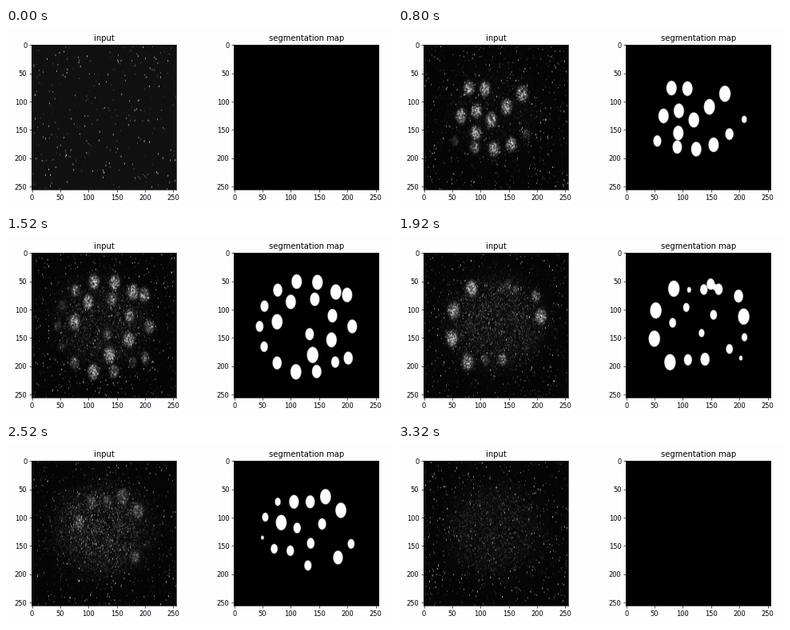
Recreate the animation shown at these times as a matplotlib script. Size 483x225 px, loop 3400 ms.

```python
import numpy as np
import matplotlib.pyplot as plt
from matplotlib.animation import FuncAnimation

W, H, DPI = 483, 225, 60
N = 256            # pixels per side of a slice
SLICES = 34        # 100 ms each, shown on a 40 ms clock
TICK = 40
CX, CY = 126, 131  # middle of the embryo
TALL = 1.42        # nuclei are taller than wide

yy, xx = np.mgrid[:N, :N].astype(float)


def sized(x, y, radii):
    """Nuclei at x, y with radii blended evenly along the row."""
    keys = np.linspace(0, 1, len(radii))
    return list(zip(x, y, np.interp(np.linspace(0, 1, len(x)), keys, radii)))


def chain(n, start, end, *radii, bend=0):
    """n nuclei from start to end, bowed sideways by bend."""
    t = np.linspace(0, 1, n)
    dx, dy = np.subtract(end, start)
    bow = bend * np.sin(np.pi * t) / np.hypot(dx, dy)
    return sized(start[0] + dx * t - dy * bow, start[1] + dy * t + dx * bow, radii)


def arc(n, radius, a0, a1, *radii):
    """n nuclei on an arc around the middle of the embryo."""
    a = np.radians(np.linspace(a0, a1, n))
    return sized(CX + radius * np.cos(a), CY + radius * np.sin(a), radii)


def single(x, y, r):
    return [(x, y, r)]


top = (chain(4, (174, 87), (92, 156), 10, 9)
       + chain(6, (55, 170), (208, 132), 7, 9, 9, 4.5, bend=32)
       + chain(2, (80, 77), (66, 126), 9)
       + chain(2, (108, 78), (93, 117), 9))
upper = (arc(11, 81, 50, 311, 7, 9.5, 6.5, 7, 9, 9.5)
         + chain(3, (199, 75), (201, 186), 9, 8, bend=-8)
         + arc(6, 51, 190, 436, 9.5, 8, 10)
         + single(133, 144, 7.5))
lower = (arc(4, 79, 128, 238, 10)
         + chain(4, (198, 77), (202, 186), 8, 10, 5, 3, bend=-9)
         + chain(3, (111, 66), (163, 65), 3.5, 6.5, 7)
         + chain(2, (149, 56), (156, 61), 7, 4)
         + chain(2, (109, 189), (139, 188), 7, 8)
         + chain(2, (82, 124), (106, 97), 6, 5.5)
         + chain(2, (154, 110), (182, 170), 6)
         + single(133, 142, 5))
bottom = (chain(3, (77, 73), (134, 73), 5, 8.5, 8)
          + chain(2, (161, 64), (188, 88), 9.5)
          + chain(3, (55, 100), (111, 119), 5.5, 9.5, 6.5)
          + chain(3, (50, 136), (99, 159), 2.5, 6, 6.5, bend=9)
          + chain(3, (155, 112), (130, 185), 7, 6.3, bend=8)
          + chain(2, (206, 147), (183, 171), 6, 8.5))

# (nuclei, widest slice, reach above, reach below)
LAYERS = [(top, 8, 5, 5), (upper, 15, 5, 4), (lower, 19, 4, 5),
          (bottom, 25, 5, 4), (single(77, 115, 1.8), 29, 3, 2)]


def visible(s):
    """Nuclei cut by slice s, with the radius of the cut."""
    for nuclei, z, above, below in LAYERS:
        d = (s - z) / (above if s < z else below)
        if abs(d) < 1:
            for x, y, r in nuclei:
                yield x, y, r * np.sqrt(1 - d * d)


def smear(a, side, axis=0):
    """Blend each pixel with its two neighbours along an axis."""
    return a + side * (np.roll(a, 1, axis) + np.roll(a, -1, axis))


def render(s):
    """Noisy input and segmentation map of slice s."""
    rng = np.random.default_rng(100 + s)
    seg = np.zeros((N, N))
    glow = np.zeros((N, N))
    for x, y, r in visible(s):
        d = np.hypot((xx - x) / r, (yy - y) / (r * TALL))
        seg = np.maximum(seg, np.clip((1 - d) * r + 0.5, 0, 1))
        gain = min(1, 1.7 * (r / 10) ** 5)
        glow = np.maximum(glow, gain * np.exp(-(d / 0.95) ** 4))

    haze = np.interp(s, [0, 3, 8, 19, 27, 33], [0, 0.1, 0.25, 0.9, 1, 0.6])
    dist = np.hypot((xx - 125) / 86, (yy - 122) / 82)
    disk = 1 / (1 + np.exp(8 * (dist - 0.9)))

    # Loose specks, bright in the first slices and finer below.
    count = np.interp(s, [0, 4], [0.006, 0.015])
    power = np.interp(s, [0, 4], [0.5, 0.27])
    specks = (rng.random((N, N)) < count) * rng.exponential(power, (N, N))
    specks = smear(specks, 0.75)

    mist = smear(rng.gamma(0.22, 1 / 0.22, (N, N)), 0.5) / 2
    grain = smear(rng.gamma(0.6, 1 / 0.6, (N, N)), 0.5) / 2
    grain = smear(grain, 0.2, axis=1) / 1.4

    light = np.interp(s, [8, 19, 25], [0.46, 0.46, 0.24])
    base = np.interp(s, [0, 4], [0.06, 0.014])
    img = (base + 0.012 * rng.random((N, N)) + specks
           + 0.085 * haze * disk * mist + light * glow * grain)
    return np.clip(img, 0, 0.85), seg


def panel(left, title):
    ax = fig.add_axes([left / W, (H - 202.2) / H, 181 / W, 181.4 / H])
    im = ax.imshow(np.zeros((N, N)), cmap="gray", vmin=0, vmax=1, aspect="auto")
    ax.set_title(title, fontsize=12)
    ax.set_xticks(range(0, N, 50))
    ax.set_yticks(range(0, N, 50))
    return im


plt.rcParams["font.family"] = "DejaVu Sans"
plt.rcParams["font.size"] = 10
fig = plt.figure(figsize=(W / DPI, H / DPI), dpi=DPI, facecolor="#fefdff")
views = panel(32.2, "input"), panel(285.4, "segmentation map")
stack = [render(s) for s in range(SLICES)]


def update(i):
    for view, data in zip(views, stack[i * TICK // 100]):
        view.set_data(data)
    return views


anim = FuncAnimation(fig, update, frames=SLICES * 100 // TICK, interval=TICK,
                     init_func=lambda: update(0), repeat=True, repeat_delay=0)
plt.show()
```
